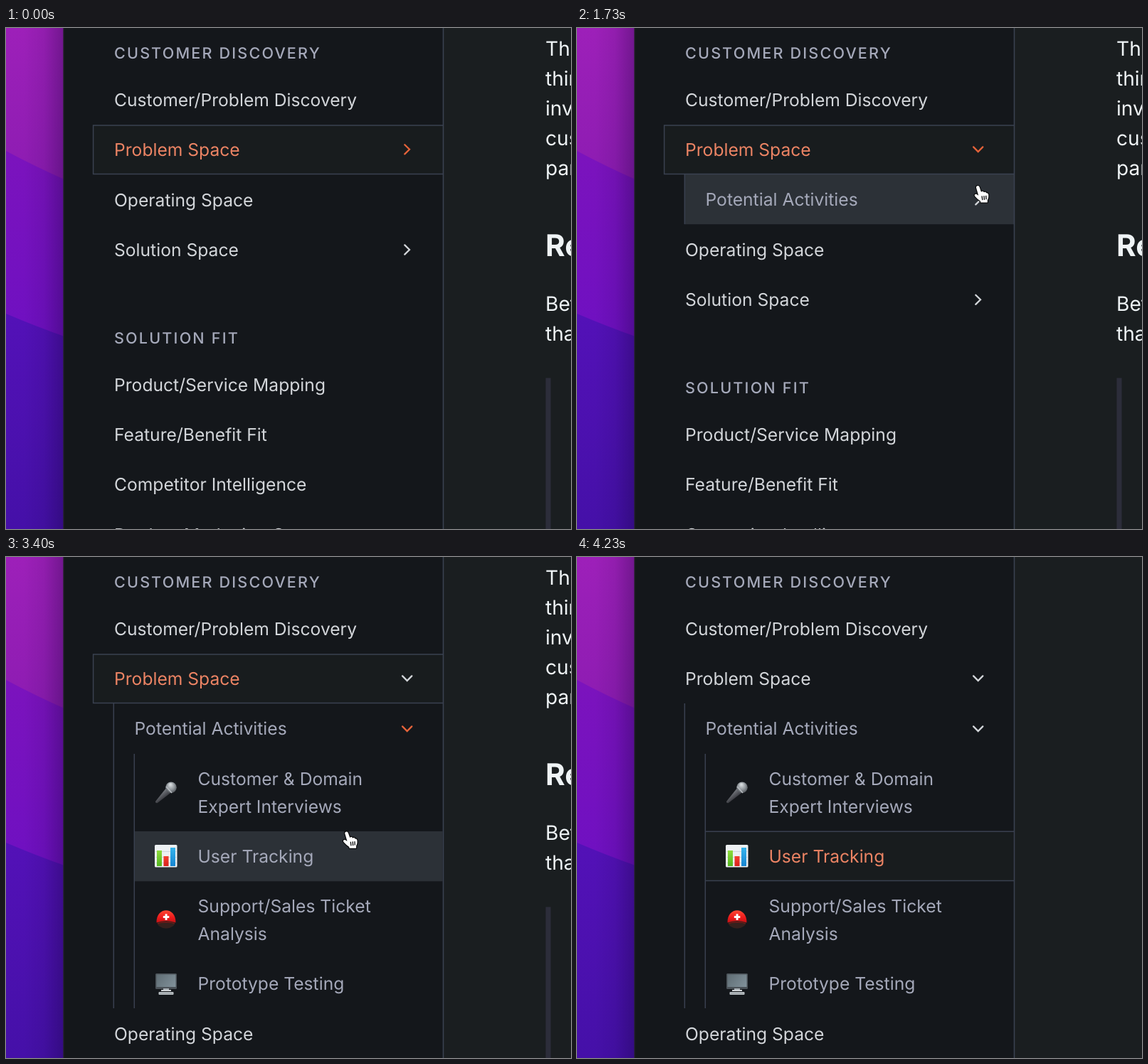
An HTML page with a canvas that plays this animation: 794x705 px, repeating every 4330 ms.

```html
<!DOCTYPE html>
<html lang="en">
<head>
<meta charset="utf-8">
<title>Sidebar navigation</title>
<style>
html, body { margin: 0; width: 100%; height: 100%; overflow: hidden; background: #14171b; }
canvas { display: block; width: 794px; height: 705px; }
</style>
</head>
<body>
<canvas id="stage" width="794" height="705"></canvas>
<script>
const ctx = document.getElementById('stage').getContext('2d');
const W = 794, H = 705, LOOP = 4330;
const FONT = 'Inter, "Open Sans", sans-serif';
const C = {
  side: '#14171b', page: '#1a1e20', active: '#181c1e', line: '#3a4150', hover: '#2c3137',
  item: '#d3d6da', sub: '#a5a9ba', accent: '#ec8464', arrow: '#e5633a', text: '#eff4f6'
};
const ROW = 70.3, EDGE = 614.5, TEXT_X = 758;
const OPEN_1 = [1000, 1200], OPEN_2 = [2030, 2250], SELECT = 3940;

// time, x, y of the pointer
const PATH = [
  [190, 800, 690], [670, 716, 300], [800, 615, 194], [870, 562, 181], [1200, 562, 181],
  [1730, 558, 222], [2000, 559, 236], [2800, 559, 236], [3000, 527, 353], [3270, 487, 378],
  [3530, 464, 393], [3730, 458, 401], [3870, 458, 401], [4210, 810, 440]
];

const clamp = v => Math.max(0, Math.min(1, v));
const ramp = (t, [a, b]) => clamp((t - a) / (b - a));
const easeOut = p => 1 - (1 - p) ** 3;

function slope(i, k) {
  if (i === 0 || i === PATH.length - 1) return 0;
  const d = j => (PATH[j + 1][k] - PATH[j][k]) / (PATH[j + 1][0] - PATH[j][0]);
  const a = d(i - 1), b = d(i);
  return a * b <= 0 ? 0 : 2 * a * b / (a + b);
}

// Monotone cubic through the path points
function pointer(t) {
  const last = PATH.length - 1;
  if (t <= PATH[0][0] || t >= PATH[last][0]) return null;
  let i = 0;
  while (PATH[i + 1][0] < t) i++;
  const a = PATH[i], b = PATH[i + 1], h = b[0] - a[0], u = (t - a[0]) / h;
  const at = k => a[k] * (1 + 2 * u) * (1 - u) ** 2 + b[k] * u * u * (3 - 2 * u)
    + h * slope(i, k) * u * (1 - u) ** 2 + h * slope(i + 1, k) * u * u * (u - 1);
  return { x: at(1), y: at(2) };
}

function rect(x, y, w, h, fill) {
  ctx.fillStyle = fill;
  ctx.fillRect(x, y, w, h);
}

function rounded(x, y, w, h, r, fill) {
  ctx.fillStyle = fill;
  ctx.beginPath();
  ctx.roundRect(x, y, w, h, r);
  ctx.fill();
}

function stroke(points, color, width = 1.5) {
  ctx.strokeStyle = color;
  ctx.lineWidth = width;
  ctx.beginPath();
  points.forEach(([x, y], i) => i ? ctx.lineTo(x, y) : ctx.moveTo(x, y));
  ctx.stroke();
}

function shade(x0, y0, x1, y1, ...colors) {
  const g = ctx.createLinearGradient(x0, y0, x1, y1);
  colors.forEach((c, i) => g.addColorStop(i / (colors.length - 1), c));
  return g;
}

// y is the middle of the line box
function label(str, x, y, color, size = 24.65, weight = 400, spacing = 0) {
  ctx.font = `${weight} ${size}px ${FONT}`;
  ctx.textRendering = 'geometricPrecision';
  ctx.letterSpacing = spacing + 'px';
  ctx.fillStyle = color;
  ctx.fillText(str, x, y + size * 0.364);
}

const heading = (str, y) => label(str, 152, y, C.sub, 21.6, 500, 2.16);
const body = (str, y) => label(str, TEXT_X, y, C.text, 28.1);

function chevron(y, turn, color) {
  ctx.save();
  ctx.translate(563.7, y);
  ctx.rotate(turn * Math.PI / 2);
  ctx.lineCap = 'round';
  stroke([[-3.4, -6.6], [3.3, 0], [-3.4, 6.6]], color, 2.3);
  ctx.restore();
}

function wallpaper() {
  rect(0, 0, 82, H, shade(0, 0, 0, 210, '#9d20b9', '#8d1cb2'));
  const band = (l, r, fill) => {
    ctx.fillStyle = fill;
    ctx.beginPath();
    ctx.moveTo(0, l);
    ctx.quadraticCurveTo(42, l + (r - l) * 0.56, 82, r);
    ctx.lineTo(82, H);
    ctx.lineTo(0, H);
    ctx.fill();
  };
  band(173, 213, shade(0, 180, 0, 430, '#7b13bd', '#6f10c1'));
  band(402, 434, shade(0, 405, 0, H, '#5311b7', '#4510a8'));
  rect(0, 0, 82, H, shade(25, 0, 82, 0, 'rgba(10,0,40,0)', 'rgba(10,0,40,.08)', 'rgba(10,0,40,.3)'));
}

function page(t) {
  rect(EDGE, 0, W - EDGE, H, C.page);
  if (t >= SELECT) return;
  ['The', 'think', 'involve', 'customer', 'part'].forEach((s, i) => body(s, 28.7 + i * 42));
  label('Research', TEXT_X, 306, C.text, 42.2, 700);
  body('Before', 387.5);
  body('that', 429.5);
  rect(758.5, 492.5, 7, H, '#2c2d3a');
}

function mic() {
  ctx.fillStyle = shade(222, 328, 228, 336, '#777a80', '#35363c');
  ctx.beginPath();
  ctx.moveTo(226, 324);
  ctx.lineTo(232.5, 331);
  ctx.lineTo(213, 346);
  ctx.quadraticCurveTo(210, 347, 210, 344);
  ctx.fill();
  const g = ctx.createRadialGradient(231, 320, 1, 232, 324, 9);
  g.addColorStop(0, '#d5dadd');
  g.addColorStop(0.55, '#8d9398');
  g.addColorStop(1, '#474b50');
  ctx.fillStyle = g;
  ctx.beginPath();
  ctx.arc(232, 324.3, 7.8, 0, 7);
  ctx.fill();
  stroke([[225, 323], [233, 332]], '#b7bbc0', 1.6);
}

function chart() {
  rounded(209, 405, 31.5, 31.5, 1.5, '#edf1f3');
  for (const p of [9, 17, 25]) rect(210, 405 + p, 29.5, 0.8, '#cbd3d8');
  rect(212, 413, 7, 22, shade(0, 413, 0, 435, '#8edb3c', '#52b51e'));
  rect(221.5, 421, 7, 14, shade(0, 421, 0, 435, '#f4402f', '#d8201d'));
  rect(231, 409, 7, 26, shade(0, 409, 0, 435, '#35b4ec', '#1684d0'));
}

function helmet() {
  ctx.fillStyle = '#35201d';
  ctx.beginPath();
  ctx.ellipse(225, 513.5, 12.5, 9.3, 0, 0, 7);
  ctx.fill();
  ctx.fillStyle = shade(0, 497, 0, 517, '#ff4a36', '#ed1c1c', '#b80d12');
  ctx.beginPath();
  ctx.moveTo(211.5, 514.5);
  ctx.bezierCurveTo(211, 491.5, 239, 491.5, 238.5, 514.5);
  ctx.quadraticCurveTo(225, 509.5, 211.5, 514.5);
  ctx.fill();
  rect(223.6, 502.3, 2.9, 8.6, '#fff');
  rect(220.8, 505.1, 8.5, 2.9, '#fff');
  stroke([[213, 516], [218, 514.3], [225, 513.6], [232, 514.3], [237, 516]], '#7c1715', 1.2);
}

function desktop() {
  rounded(210, 586, 30, 22, 1.5, '#4a5157');
  rect(211.5, 587.5, 27, 17.5, shade(211, 587, 238, 605, '#5f6d74', '#81919a'));
  rect(221, 607, 8, 3.5, '#a4abb0');
  rounded(218, 609, 14, 2, 0.5, '#d2d6d9');
  rounded(214.5, 612, 21, 4, 1, '#b9bfc3');
  stroke([[216, 614], [234, 614]], '#858c91', 0.8);
}

function hoveredRow(p, t) {
  if (!p || p.x + 5 > 613) return '';
  const y = p.y + 1;
  if (t >= OPEN_1[1] && y > 206 && y < 277) return 'activities';
  if (t < OPEN_2[1]) return '';
  if (y >= 277 && y < 386) return 'interviews';
  return y >= 386 && y < 456 ? 'tracking' : '';
}

function clipBelow(y, h, draw) {
  if (h <= 0) return;
  ctx.save();
  ctx.beginPath();
  ctx.rect(82, y, EDGE - 82, h);
  ctx.clip();
  draw();
  ctx.restore();
}

function leaves(t, hover, selected) {
  if (hover === 'interviews') rect(180.5, 277, 433, 108.8, C.hover);
  if (selected) {
    rect(180.5, 386, 433, 70, C.active);
    for (const y of [386.3, 455.5]) stroke([[180, y], [EDGE, y]], C.line);
  } else if (hover === 'tracking') rect(180.5, 386, 433, 70.3, C.hover);
  stroke([[180.3, 277], [180.3, 635]], C.line);
  const rows = [['Customer & Domain', 312], ['Expert Interviews', 351], ['User Tracking', 421],
    ['Support/Sales Ticket', 491], ['Analysis', 530], ['Prototype Testing', 600.4]];
  rows.forEach(([s, y], i) => label(s, 269.5, y, selected && i === 2 ? C.accent : C.sub));
  ctx.globalAlpha = ramp(t, [2200, 2430]);
  mic();
  chart();
  helmet();
  desktop();
  ctx.globalAlpha = 1;
}

function sidebar(t, hover) {
  const p1 = easeOut(ramp(t, OPEN_1)), p2 = easeOut(ramp(t, OPEN_2));
  const selected = t >= SELECT, deep = t >= OPEN_2[0];
  const leafH = 358.6 * p2, subH = ROW * p1 + leafH;

  rect(81, 0, EDGE - 81, H, C.side);
  rect(80.3, 0, 1.2, H, '#25232d');
  heading('CUSTOMER DISCOVERY', 35);
  label('Customer/Problem Discovery', 152, 100.7, C.item);

  clipBelow(206, subH, () => {
    if (hover === 'activities') rect(151, 206, EDGE - 151, 70.8, C.hover);
    stroke([[151.3, 206], [151.3, 206 + subH]], C.line);
    label('Potential Activities', 180.5, 241.5, C.sub);
    chevron(241.8, p2, deep && !selected ? C.arrow : C.item);
    clipBelow(277, leafH, () => leaves(t, hover, selected));
  });

  if (!selected) {
    rect(122.5, 137, EDGE - 122.5, 68.5, C.active);
    stroke([[EDGE, 137], [122.6, 137], [122.6, 205.5], [EDGE, 205.5]], C.line);
  }
  label('Problem Space', 152, 171.2, selected ? C.item : C.accent);
  chevron(170.8, p1, deep ? C.item : C.arrow);

  label('Operating Space', 152, 241.7 + subH, C.item);
  label('Solution Space', 152, 312 + subH, C.item);
  chevron(312 + subH, 0, C.item);
  heading('SOLUTION FIT', 435.7 + subH);
  ['Product/Service Mapping', 'Feature/Benefit Fit', 'Competitor Intelligence',
    'Product Marketing Context'].forEach((s, i) =>
    label(s, 152, 501.8 + i * ROW + subH, C.item));
  stroke([[EDGE, 0], [EDGE, H]], C.line, 1.6);
}

const HAND = new Path2D('M3 2.6C2.6-.2 6.6-1 7.6 1.8L10 8.6C11.2 7.2 13.4 7.6 13.9 9.3' +
  'C15 8.2 16.9 8.7 17.3 10.3C18.6 9.7 20 10.7 20.2 12.4C20.6 16 20 18 18.9 20L18.8 23.4' +
  'H9.3L9 21.6C6.6 20 3.6 17.4 1.2 14.6C-.2 12.6 2 11 4 12.2L6.2 13.6Z');
const CREASES = new Path2D('M11 14.4L11.8 20M13.9 14L14.5 19.8M16.7 13.8L17.1 19.2');
const ARROW = new Path2D('M5 0V19L9.3 15.1L12.2 21.8L15.2 20.5L12.3 13.9H18Z');

function drawPointer(p) {
  ctx.save();
  ctx.translate(p.x, p.y);
  ctx.lineJoin = 'round';
  const hand = p.x + 5 < 613, shape = hand ? HAND : ARROW;
  ctx.strokeStyle = hand ? '#08090a' : '#fff';
  ctx.fillStyle = hand ? '#fff' : '#08090a';
  ctx.lineWidth = 2.4;
  ctx.stroke(shape);
  ctx.fill(shape);
  if (hand) {
    ctx.lineWidth = 1.3;
    ctx.stroke(CREASES);
  }
  ctx.restore();
}

function draw(t) {
  const p = pointer(t);
  wallpaper();
  page(t);
  sidebar(t, hoveredRow(p, t));
  if (p) drawPointer(p);
}

const start = performance.now();
function tick() {
  draw((performance.now() - start) % LOOP);
  requestAnimationFrame(tick);
}
tick();
</script>
</body>
</html>
```
